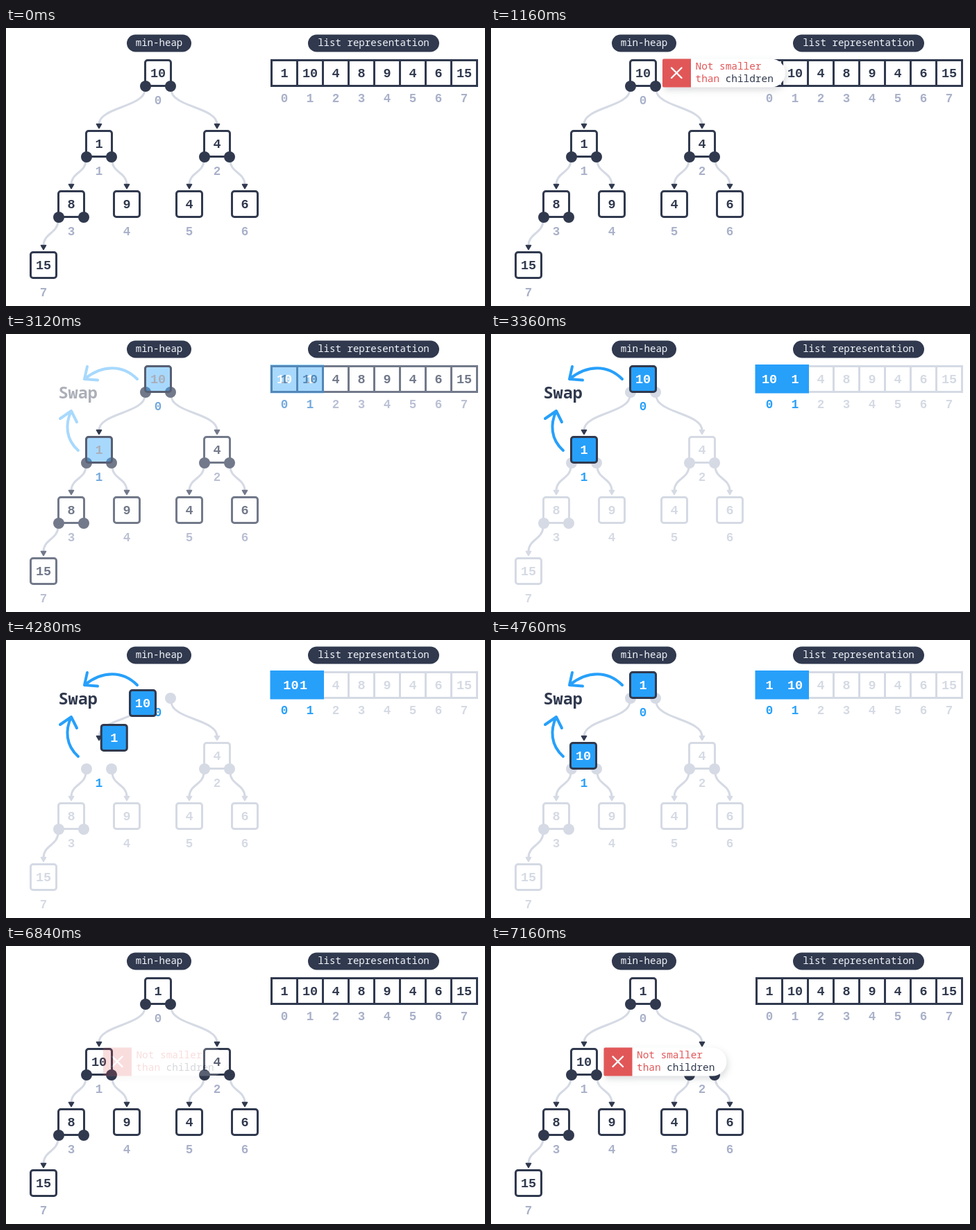
These frames come from a looping animation (690x401 px, 8 s). An HTML page:

```html
<!DOCTYPE html>
<html lang="en">
<head>
<meta charset="utf-8">
<title>Min-heap sift down</title>
<style>
  html, body { margin: 0; width: 100%; height: 100%; overflow: hidden; background: #fff; }
  svg { display: block; width: 690px; height: 401px; }
  text { font-family: "Noto Sans Mono", "DejaVu Sans Mono", monospace; white-space: pre; }
  .num { font: bold 18.5px "Liberation Mono", "DejaVu Sans Mono", monospace; text-anchor: middle; }
  .pill { font-size: 14.1px; fill: #f4f6fa; text-anchor: middle; }
  .note { font-size: 14.4px; }
  .line { stroke: var(--ink); stroke-width: 3; }
  .ink { fill: var(--ink); }
  .idx { fill: var(--idx); font-size: 17.5px; }
  .hot { fill: var(--hot); font-size: 17.5px; }
  .edge { fill: none; stroke: #d5dae4; stroke-width: 3; }
  .sketch { fill: none; stroke: #27a0fa; stroke-width: 4; stroke-linecap: round; stroke-linejoin: round; }
  .callout { filter: drop-shadow(2px 4px 5px rgba(40, 45, 60, .17)); }
</style>
</head>
<body>
<svg id="stage" viewBox="0 0 690 401"></svg>
<script>
const NS = 'http://www.w3.org/2000/svg';
const stage = document.getElementById('stage');
const DARK = '#30394e', BLUE = '#27a0fa', RED = '#e15758';
const LOOP = 8000, STEP = 40;

function add(parent, tag, attrs = {}, text) {
  const el = document.createElementNS(NS, tag);
  for (const key in attrs) el.setAttribute(key, attrs[key]);
  if (text !== undefined) el.textContent = text;
  parent.append(el);
  return el;
}
const group = (parent = stage, attrs) => add(parent, 'g', attrs);
const num = (parent, x, y, value, attrs) =>
  add(parent, 'text', { class: 'num', x, y: y + 6, ...attrs }, value);

// Heap order: centre x, centre y, value
const nodes = [
  [219, 65, 10], [134, 167, 1], [304, 167, 4], [94, 254, 8],
  [174, 254, 9], [264, 254, 4], [344, 254, 6], [54, 342, 15]
];
const listValues = [1, 10, 4, 8, 9, 4, 6, 15];
const cellX = i => 401 + 37 * i;

function pill(x, width, label) {
  add(stage, 'rect', { x, y: 9.5, width, height: 25, rx: 12.5, fill: DARK });
  add(stage, 'text', { class: 'pill', x: x + width / 2, y: 25.5 }, label);
}

function box(parent, x, y, attrs) {
  return add(parent, 'rect',
    { x: x - 18.5, y: y - 18.5, width: 37, height: 37, rx: 3.5, 'stroke-width': 3, ...attrs });
}

function edge(i) {
  const [x, y] = nodes[i], [px, py] = nodes[(i - 1) >> 1];
  const side = i % 2 ? -1 : 1;
  const x0 = px + side * 19, y0 = py + 24, y1 = y - 28, ym = (y0 + y1) / 2;
  add(stage, 'path', { class: 'edge', d: `M${x0} ${y0}C${x0} ${ym} ${x} ${ym} ${x} ${y1}` });
  const color = i === 1 ? DARK : 'var(--ink)';
  add(stage, 'path', {
    d: `M${x - 3.5} ${y - 28.5}h7l-3.5 6z`, fill: color, stroke: color,
    'stroke-width': 1.6, 'stroke-linejoin': 'round'
  });
}

// Tree
pill(174, 93, 'min-heap');
pill(435, 189, 'list representation');
for (let i = 1; i < nodes.length; i++) edge(i);

const plain = nodes.map(([x, y, value], i) => {
  const g = group();
  box(g, x, y, { class: 'line', fill: '#fff' });
  const label = num(g, x, y, value, { class: 'num ink' });
  if (2 * i + 1 < nodes.length)
    for (const dx of [-18, 18])
      add(stage, 'circle', { class: 'ink', cx: x + dx, cy: y + 19, r: 8 });
  num(stage, x, y + 39, i, { class: i < 2 ? 'num hot' : 'num idx' });
  return { g, label };
});

// List
add(stage, 'rect', { class: 'line', x: 382.5, y: 46.5, width: 296, height: 37, fill: '#fff' });
listValues.forEach((value, i) => {
  const x = cellX(i);
  if (i) add(stage, 'path', { class: 'line', d: `M${x - 18.5} 46v38` });
  num(stage, x, 65, value, { class: 'num ink' });
  num(stage, x, 101, i, { class: i < 2 ? 'num hot' : 'num idx' });
});

// Highlighted pair
const focus = group();
add(focus, 'rect', { x: 380.5, y: 44, width: 77.5, height: 41.5, fill: BLUE });
const cells = [10, 1].map(v => num(focus, 0, 65, v, { fill: '#fff' }));
const movers = [1, 10].map(v => {
  const g = group(focus);
  box(g, 0, 0, { fill: BLUE, stroke: DARK });
  num(g, 0, 0, v, { fill: '#fff' });
  return g;
});

add(focus, 'text', { x: 75.5, y: 93, 'font-size': 23.5, 'font-weight': 700, fill: DARK }, 'Swap');
for (const d of [
  'M189 65C168 44 139 44 113 65M117 47L113 65L132 66.5',
  'M104 168C86 152 85 130 94 111M78 122L94 111L102 127'
]) add(focus, 'path', { class: 'sketch', d });

// Warning callout, drawn beside the root
const callout = group();
const card = group(callout, { class: 'callout' });
add(card, 'path', { d: 'M249 44.5H403.5a20.5 20.5 0 0 1 0 41H249z', fill: '#fff' });
add(card, 'path', { d: 'M288 44.5H249a2 2 0 0 0-2 2V83.500a2 2 0 0 0 2 2H288z', fill: RED });
add(callout, 'path', {
  d: 'M260 57.500l14.500 14.500m0-14.500l-14.500 14.500',
  stroke: '#fff', 'stroke-width': 2.4, 'stroke-linecap': 'round'
});
add(callout, 'text', { class: 'note', x: 294.5, y: 60, fill: RED }, 'Not smaller');
const line2 = add(callout, 'text', { class: 'note', x: 294.5, y: 78, fill: RED }, 'than ');
add(line2, 'tspan', { fill: DARK }, 'children');

// Timing
const clamp = v => Math.min(1, Math.max(0, v));
const ramp = (t, from, to) => clamp((t - from) / (to - from));
const lerp = (a, b, p) => a + (b - a) * p;
const easeOut = p => 1 - (1 - p) ** 3;
const easeInOut = p => p < .5 ? 4 * p ** 3 : 1 - 4 * (1 - p) ** 3;
const rgb = hex => [1, 3, 5].map(i => parseInt(hex.slice(i, i + 2), 16));
const mix = (a, b, p) => {
  const to = rgb(b);
  return `rgb(${rgb(a).map((v, i) => Math.round(lerp(v, to[i], p)))})`;
};
const place = (el, x, y) => el.setAttribute('transform', `translate(${x} ${y})`);

function draw(t) {
  const dim = ramp(t, 2960, 3360) * (1 - ramp(t, 5560, 5760));
  stage.style.setProperty('--ink', mix(DARK, '#d5dae4', dim));
  stage.style.setProperty('--idx', mix('#a9b1c9', '#d5dae4', dim));
  stage.style.setProperty('--hot', mix('#a9b1c9', BLUE, dim));
  focus.style.opacity = dim;

  const swapped = t >= 4760;
  plain.slice(0, 2).forEach(({ g, label }, i) => {
    g.style.visibility = dim === 1 ? 'hidden' : 'visible';
    label.textContent = nodes[swapped ? 1 - i : i][2];
  });

  const p = easeInOut(ramp(t, 3960, 4760));
  place(movers[0], lerp(134, 219, p), lerp(167, 65, p));
  place(movers[1], lerp(219, 133, p), lerp(65, 167, p));
  cells[0].setAttribute('x', lerp(cellX(0), cellX(1), p));
  cells[1].setAttribute('x', lerp(cellX(1), cellX(0), p));

  const second = t >= 6760;
  const enter = second ? ramp(t, 6760, 7160) : ramp(t, 760, 1160);
  const leave = second ? 0 : ramp(t, 2760, 2960);
  const slide = -44 * (1 - easeOut(enter));
  place(callout, slide + (second ? -84.5 : 0), second ? 102 : 0);
  callout.style.opacity = enter * (1 - leave);
}

const start = performance.now();
function tick(now) {
  const t = Math.max(0, now - start) % LOOP;
  draw(Math.floor(t / STEP) * STEP);
  requestAnimationFrame(tick);
}
draw(0);
requestAnimationFrame(tick);
</script>
</body>
</html>
```
